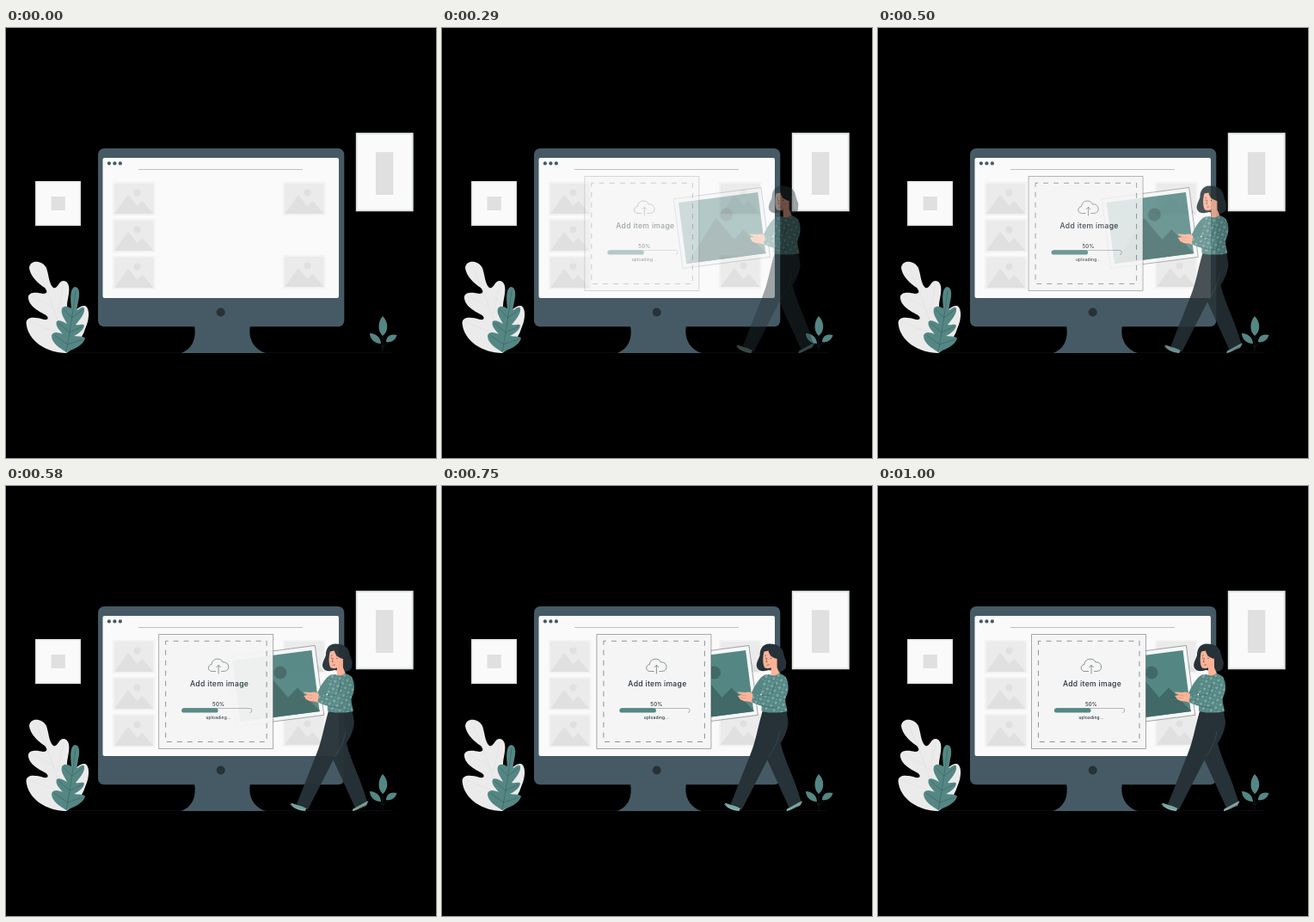
Write an HTML page that moves like this. It is 500x500 px and loops after 1.04 s.

```html
<!DOCTYPE html>
<html lang="en">
<head>
<meta charset="utf-8">
<title>Add item image</title>
<style>
html, body { margin: 0; width: 100%; height: 100%; overflow: hidden; background: #000; }
svg { display: block; width: 100%; height: 100%; }
text { font-family: Inter, Roboto, sans-serif; text-anchor: middle; font-weight: 500; letter-spacing: .035em; fill: #263238; }
.teal { fill: #548784; }
.dark { fill: #263238; }
.skin { fill: #ffb397; }
.line { fill: none; stroke: #263238; stroke-width: .5; stroke-linejoin: round; }
</style>
</head>
<body>
<svg viewBox="0 0 500 500">
  <defs>
    <g id="thumb">
      <path fill="#ebebeb" stroke="#f3f3f3" stroke-width="2" d="M0 0H47.5V37H0Z"/>
      <path fill="#e0e0e0" d="M1 36 17 14 27.500 27 33.500 21 46.500 36Z"/>
      <circle cx="27.500" cy="11.500" r="4" fill="#e0e0e0"/>
    </g>
    <pattern id="knit" width="9" height="9" patternUnits="userSpaceOnUse" patternTransform="rotate(14)">
      <path fill="#548784" d="M0 0H9V9H0Z"/>
      <path fill="none" stroke="#b5d0cc" stroke-width=".55" d="M1 1.500 3.500 1 2.500 3.500ZM5.500 6 8 5.500 7 8ZM6 2.500 7.500 2M1.500 7 3 6.500"/>
    </pattern>
  </defs>

  <!-- Wall pictures -->
  <g fill="#fafafa" stroke="#dfe6e2">
    <path stroke-width="1.500" d="M34.800 178.800H86.200V229.300H34.800Z"/>
    <path stroke-width="2" d="M407.800 122.800H472.700V212.200H407.800Z"/>
  </g>
  <path fill="#e0e0e0" d="M52.500 196H68.800V212H52.500ZM430 144.300H450.300V194H430Z"/>

  <!-- Monitor -->
  <path class="line" opacity=".5" d="M60 377.500H450"/>
  <g fill="#455a64">
    <rect x="107" y="140" width="286.300" height="207.300" rx="7"/>
    <path d="M219 346C222 362 216 373 204 378H302C289 374 281 362 284 346Z"/>
    <circle class="dark" cx="249.700" cy="330.500" r="5"/>
    <rect x="112.500" y="151" width="274.500" height="163" rx="2" fill="#fafafa"/>
    <circle cx="119.900" cy="157.400" r="2.100"/>
    <circle cx="126.400" cy="157.400" r="2.100"/>
    <circle cx="132.900" cy="157.400" r="2.100"/>
  </g>
  <path stroke="#b0b0b0" stroke-width=".8" d="M154 164.500H345"/>
  <use href="#thumb" x="125" y="180"/>
  <use href="#thumb" x="125" y="223"/>
  <use href="#thumb" x="125" y="266"/>
  <use href="#thumb" x="323" y="180"/>
  <use href="#thumb" x="323" y="265"/>

  <!-- Plants -->
  <path fill="#ebebeb" d="M70 378C48 378 25 364 23.500 343C24 335 34 336 44 339C50 340 50 336 45 333C37 329 25 322 26 312C28 306 38 308 43 309C48 309 49 306 45 302C37 297 28 288 27 279C28 269 42 270 47 279C50 288 50 298 55 302C60 304 61 294 67 294C75 295 74 306 72 315C70 324 71 331 75 331C80 331 85 322 92 323C98 326 97 340 92 350C88 362 80 372 70 378Z"/>
  <path fill="none" stroke="#e0e0e0" stroke-width=".6" d="M36 279C50 310 62 340 70 377M30 312 55 325M67 298 60 332M28 342 64 356"/>
  <path class="teal" d="M70 377C62 372 53 366 53 358C54 352 62 354 66 356C61 350 57 346 59 341C62 339 67 342 71 344C68 338 63 332 65 326C68 322 73 324 76 326C75 316 74 303 80 301C86 301 86 310 84 318C83 324 82 327 83 328C86 326 90 323 91 326C92 332 86 339 81 345C85 346 90 343 91 346C90 352 83 356 79 358C84 359 91 358 92 361C90 369 78 374 70 377Z"/>
  <path class="line" opacity=".6" d="M81 305C78 330 74 355 70 377M67 327 76.500 337 89 328M61 343 74 354 89 347M56 357 71.500 368 89 362"/>
  <path class="line" d="M438 340V376M426 357 438 371 452 359"/>
  <path class="teal" d="M438 335C445 342 445 353 438 358C432 353 432 342 438 335ZM423 355C431 355 436 361 436 367C428 367 423 361 423 355ZM442 365C442 358 448 355 454.500 357C453 363 448 366 442 365Z"/>

  <!-- Woman carrying the photo -->
  <g id="woman">
    <g transform="translate(256.700 198.700) rotate(-7.400)">
      <path fill="#f7f7f7" stroke="#263238" stroke-width=".4" d="M0 0H102.500V81.500H0Z"/>
      <path class="teal" d="M5 5H98V76.500H5Z"/>
    </g>
    <path fill="#416967" d="M272 274 306 221 327 246 338 234.500 364.500 262Z"/>
    <circle cx="318" cy="217" r="7.500" fill="#416967"/>

    <path class="dark" d="M383 183.500C374 183 371 190 371 197C369 203 364 209 370 214C374 216 378 215 381 214L388 215C393 217 402 216 401.500 208C403 203 399 200 398.500 194C397 187 391 183.500 383 183.500Z"/>
    <path class="skin" d="M376 192.500C374 199 374.500 208 376.500 211C379 213 383 212 384 211L384 221C388 223 393 221 394 218L391 211V201C386 200 382 197 381 191.500Z"/>
    <path class="line" d="M376.800 197.500 378.800 196.800M383 197.300 386 198M379.500 200 378.300 204.500 380 204.800M379 208.300 382 207.800"/>
    <circle class="dark" cx="377.800" cy="200" r=".6"/>
    <circle class="dark" cx="384" cy="200.300" r=".6"/>

    <path class="teal" d="M378 219C370 222 365 233 361 241L368 247 380 232Z"/>
    <path class="dark" d="M385 300 379 317 405 374 419 367C412 341 400 320 395 299C400 292 404 282 404 274L402 262Z"/>
    <path class="dark" d="M374 262C369 279 366 298 360 312L337 370 350 376.500 383 312C391 299 403 281 402 262Z"/>
    <path fill="none" stroke="#455a64" stroke-width=".5" d="M394 285C392 298 387 307 381 315"/>
    <path fill="url(#knit)" d="M382 219C377 219 374 222 373 229L373 262C382 264 394 264 403 262C402 256 400 250 401 246C405 239 405 228 401 222C397 218 393 218 393 218C390 221 386 221 382 219Z"/>
    <path class="skin" d="M364 243C361 239 357 239 354 240L345 239.500C346 242 350 242 350 243L345 244 347 246C347 248 350 249 352 250C357 251 360 250 363 253L367 247Z"/>
    <path class="line" opacity=".3" d="M350 243 356 244M349 246 355 247"/>
    <path fill="url(#knit)" d="M391 224C386 230 386 238 383 243C377 244 369 243 363 242L361.500 251C370 256 382 259 391 257C399 252 404 238 402 226C399 220 394 220 391 224Z"/>
    <path class="line" opacity=".55" d="M389 229C387 236 386 241 383 243L373 243.500M391 257C385 258 379 257 374 255.500"/>

    <path fill="#78a9a5" d="M330 368.500C335 370 344 372 348.500 375L347 377.500C340 377 332 374 330 368.500ZM420 366 417.500 371C411 373 407 377 402 377.500L402.500 375.500Z"/>
    <path fill="none" stroke="#e0e8e6" stroke-width=".6" d="M329.800 370C334 375 341 377 347 377.500M420 367 417.500 371.500C411 373.500 407 377 402 377.500"/>
  </g>

  <!-- Upload panel -->
  <g id="panel">
    <path fill="#f5f5f5" stroke="#263238" stroke-width=".4" d="M178.500 172.500H311.500V305.500H178.500Z"/>
    <path class="line" stroke-dasharray="6 6" stroke-dashoffset="3" d="M186.500 180.300H304V297.500H186.500Z"/>
    <path class="line" d="M245 215.500H240C235 215 235 208 240 207.500C240 200 251 199 253 205C258 204 261 209 259 213C258 215 256 215.500 251 215.500M248 218.500V208.500M245.300 211 248 208.300 250.700 211"/>
    <text x="249" y="233.200" font-size="8.600">Add item image</text>
    <text x="248" y="255.700" font-size="6">50%</text>
    <rect class="line" x="205.300" y="258.500" width="81.500" height="5" rx="2.500" opacity=".65" stroke-dasharray="84 92"/>
    <rect class="teal" x="205" y="258.200" width="42.500" height="5.400" rx="2.700"/>
    <text x="248" y="271.200" font-size="4.800">uploading...</text>
  </g>
</svg>
<script>
const LOOP = 1040, FPS = 24, REACH = 22, LEAD = .057, APPEAR = 3;
const woman = document.getElementById("woman");
const panel = document.getElementById("panel");

const bezier = (s, a, b) => 3 * s * (1 - s) ** 2 * a + 3 * s * s * (1 - s) * b + s ** 3;

// cubic-bezier(.36, -.01, .5, 1.38): slow start, slight overshoot
function ease(x) {
  let low = 0, high = 1;
  for (let i = 0; i < 24; i++) {
    const mid = (low + high) / 2;
    if (bezier(mid, .36, .5) < x) low = mid; else high = mid;
  }
  return bezier(low, -.01, 1.38);
}

function place(group, x, opacity) {
  group.setAttribute("transform", `translate(${x.toFixed(2)} 0)`);
  group.setAttribute("opacity", opacity);
}

function draw(now) {
  const step = Math.floor((now % LOOP + 4) * FPS / 1000);
  const progress = ease(Math.min(1, step / FPS + LEAD));
  const opacity = step < APPEAR ? 0 : Math.min(1, progress);
  const x = REACH * (1 - progress);
  place(woman, x, opacity);
  place(panel, -x, opacity);
}

const start = performance.now();
function tick() {
  draw(performance.now() - start);
  requestAnimationFrame(tick);
}
tick();
</script>
</body>
</html>
```
